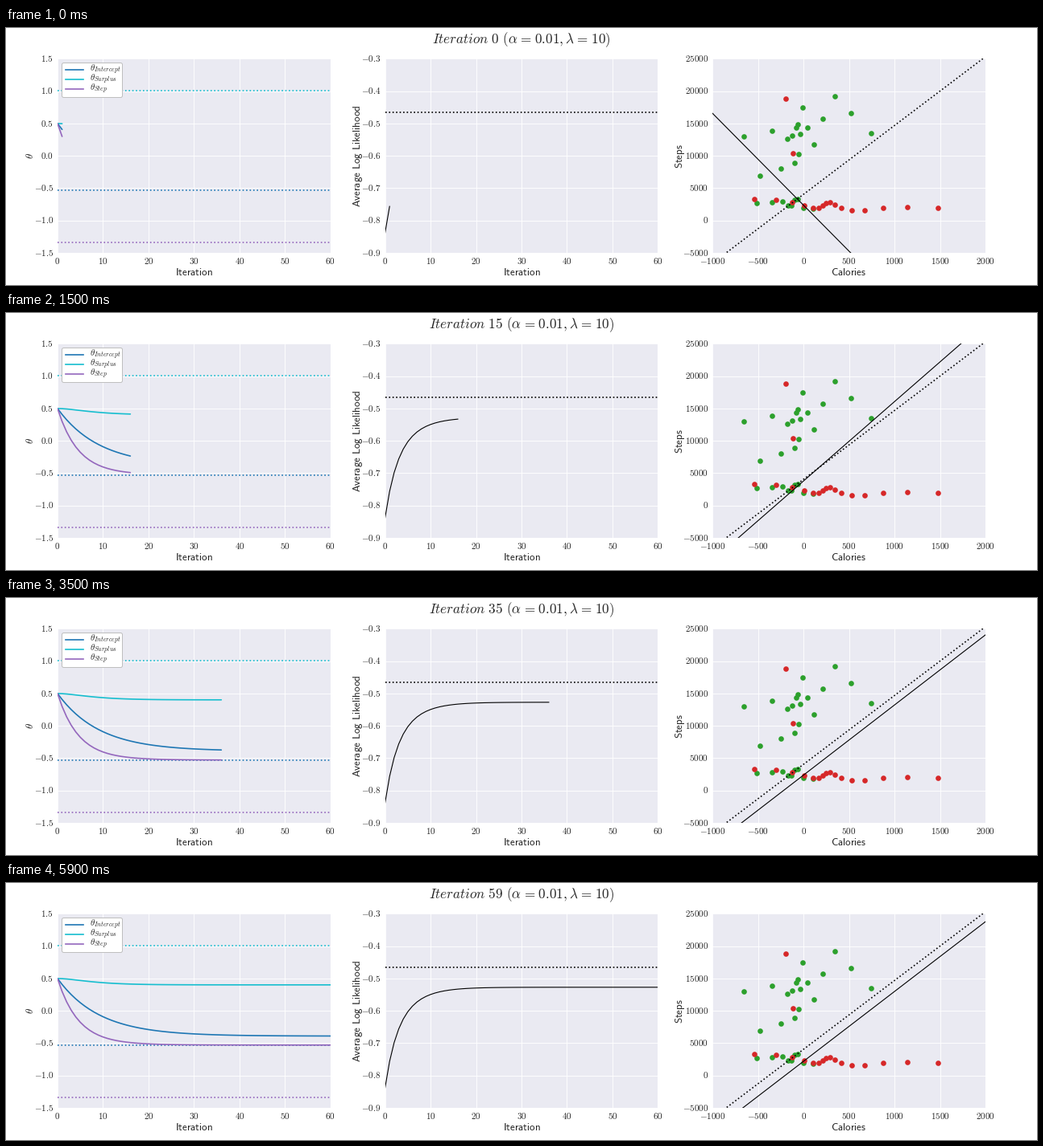
A matplotlib script that plays this animation: 1280x320 px, repeating every 6 s.

```python
import numpy as np
import matplotlib.pyplot as plt
from matplotlib.animation import FuncAnimation
from matplotlib.patches import FancyBboxPatch

plt.rcParams["mathtext.fontset"] = "cm"

W, H, DPI = 1280, 320, 80
STEPS = 60
ALPHA, LAM = 0.01, 10
INK = "0.15"
BLUE, CYAN, PURPLE = "#1f77b4", "#17becf", "#9467bd"
GREEN, RED = "#2ca02c", "#d62728"


def spread(n, *cubic):
    """n indices, n positions in -1..1, and a cubic bunched near the middle."""
    u = np.linspace(-1, 1, n)
    return np.arange(n), u, np.polyval(cubic, u)


def met_goal():
    # active days: rising trend under a slowing wave
    k, u, x = spread(18, 600, 100, 100, -60)
    wave = np.cos(2 * np.pi * (np.sqrt(12.25 + 4 * k) - 3.5))
    cloud = np.column_stack([x, 13200 + 3500 * u + 3300 * wave])
    # quiet days: swings that widen along the band
    k, u, x = spread(9, 190, -79, 120, -130)
    band = np.column_stack([x, 2700 + 150 * k * np.sin(np.pi / 2 * (k - 0.5))])
    return np.vstack([cloud, band])


def missed_goal():
    k, u, x = spread(16, 711, 200, 300, 270)
    y = 2500 - 0.7 * x + 500 * np.sin(0.9 * (k - 6))
    return np.vstack([np.column_stack([x, y]), (-192, 18903), (-116, 10397)])


# training curves: a fast and a slow mode, both relaxing from 0.5
SLOW, FAST = 0.109, 0.225
n = np.arange(STEPS + 1)
slow, fast = np.exp(-SLOW * n), np.exp(-FAST * n)


def relax(end, decay):
    return end + (0.5 - end) * decay


thetas = [relax(-0.39, slow),
          relax(0.402, (1 + FAST * n) * fast),
          relax(-0.529, 0.93 * fast + 0.07 * slow)]
score = -0.527 - 0.186 * slow**2 - 0.125 * fast**2

# calories and steps are standardised before training
MEAN, STD = (70, 7323), (418.6, 5944)

fig, axes = plt.subplots(1, 3, figsize=(W / DPI, H / DPI), dpi=DPI,
                         facecolor="white")
fig.subplots_adjust(left=0.05, right=0.95, bottom=0.125, top=0.88, wspace=0.2)

# full-stage layer in pixels, y pointing down
page = fig.add_axes([0, 0, 1, 1], zorder=5)
page.set(xlim=(0, W), ylim=(H, 0))
page.axis("off")


def write(x, y, text, size=10, ha="center", rotation=0):
    return page.text(x, y, f"${text}$", fontsize=size, color=INK, ha=ha,
                     va="baseline", rotation=rotation,
                     rotation_mode="anchor")


def sans(text):
    return r"\mathsf{" + text.replace(" ", r"\ ") + "}"


def setup(ax, xticks, yticks, fmt, xlabel, ylabel, ylabel_x):
    ax.set_facecolor("#eaeaf2")
    ax.set(xlim=(xticks[0], xticks[-1]), ylim=(yticks[0], yticks[-1]),
           xticks=xticks, yticks=yticks)
    ax.set_axisbelow(True)
    ax.grid(color="white", lw=0.8)
    ax.tick_params(length=0, labelleft=False, labelbottom=False)
    for side in ax.spines.values():
        side.set_visible(False)

    box = ax.get_position()
    left, right = box.x0 * W, box.x1 * W
    top, bottom = (1 - box.y1) * H, (1 - box.y0) * H
    for v, x in zip(xticks, np.linspace(left, right, len(xticks))):
        write(x, 293.7, f"{v:.0f}")
    for v, y in zip(yticks, np.linspace(bottom, top, len(yticks))):
        write(left - 5, y + 3.6, format(v, fmt), ha="right")
    write((left + right) / 2, 308.5, sans(xlabel), 11.75)
    write(ylabel_x, (top + bottom) / 2, ylabel, 11.75, rotation=90)


ax_theta, ax_score, ax_data = axes
epochs = np.arange(0, STEPS + 1, 10)
setup(ax_theta, epochs, np.arange(-3, 4) / 2, ".1f",
      "Iteration", r"\theta", 34.5)
setup(ax_score, epochs, np.arange(-9, -2) / 10, ".1f",
      "Iteration", sans("Average Log Likelihood"), 440)
setup(ax_data, np.arange(-1000, 2001, 500), np.arange(-5000, 25001, 5000),
      ".0f", "Calories", sans("Steps"), 840)

title = write(W / 2, 19, "", 15.4)
EQUALS = r"\hspace{0.1}=\hspace{0.1}"

# legend
page.add_patch(FancyBboxPatch((69.5, 43.5), 75, 43,
                              boxstyle="round,pad=0,rounding_size=2.2",
                              fc="white", ec="0.75", lw=0.9))

paths = []
series = [("Intercept", BLUE, -0.536), ("Surplus", CYAN, 1.003),
          ("Step", PURPLE, -1.341)]
for k, (name, color, goal) in enumerate(series):
    y = 51.6 + 12 * k
    page.plot([74, 96], [y, y], color=color, lw=1.5)
    write(104, y + 3, rf"\theta_{{{name}}}", ha="left")
    ax_theta.axhline(goal, color=color, ls=":", lw=1.5)
    paths += ax_theta.plot([], [], color=color, lw=1.5,
                           solid_capstyle="round")

ax_score.axhline(-0.465, color="black", ls=":", lw=1.5)
score_path, = ax_score.plot([], [], color="black", lw=1)

for points, color in ((met_goal(), GREEN), (missed_goal(), RED)):
    ax_data.scatter(*points.T, s=36, lw=0, c=color)
ends = np.array([-1000, 2000])
ax_data.plot(ends, [-6585, 25330], color="black", ls=":", lw=1.5)
boundary, = ax_data.plot([], [], color="black", lw=1)


def update(i):
    seen = slice(i + 2)
    for path, theta in zip(paths, thetas):
        path.set_data(n[seen], theta[seen])
    score_path.set_data(n[seen], score[seen])
    a, b, c = (theta[i] for theta in thetas)
    z = -(a + b * (ends - MEAN[0]) / STD[0]) / c
    boundary.set_data(ends, MEAN[1] + STD[1] * z)
    title.set_text(rf"$Iteration\ {i}\ (\alpha{EQUALS}{ALPHA}, "
                   rf"\lambda{EQUALS}{LAM})$")
    return [*paths, score_path, boundary, title]


anim = FuncAnimation(fig, update, frames=STEPS, interval=100,
                     repeat=True, repeat_delay=0)
plt.show()
```
